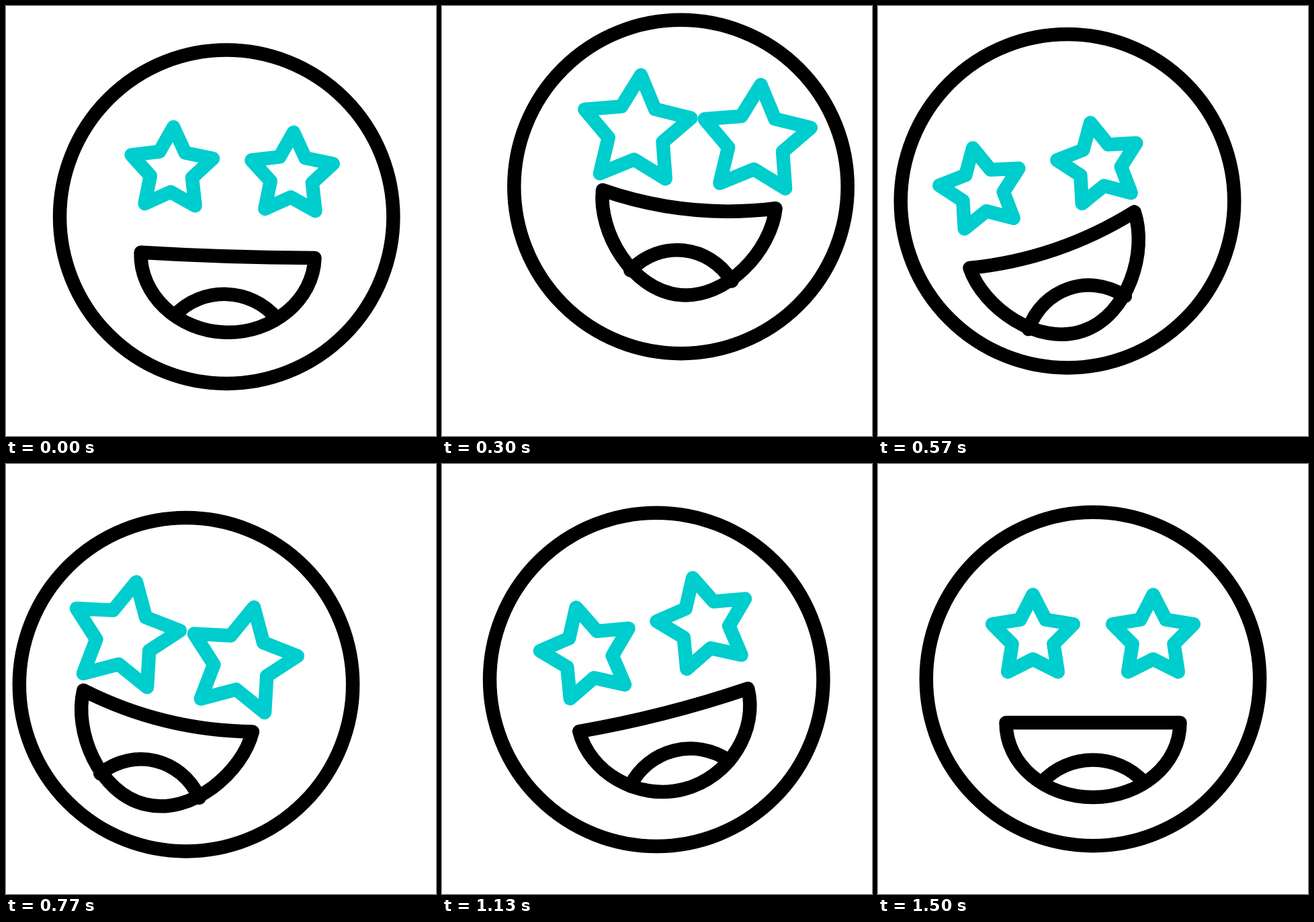
An HTML page with a canvas that plays this animation: 640x640 px, repeating every 1670 ms.

```html
<!DOCTYPE html>
<html lang="en">
<head>
<meta charset="utf-8">
<title>Star-struck face</title>
<style>
  html, body { margin: 0; width: 100%; height: 100%; overflow: hidden; background: #fff; }
  canvas { display: block; width: 640px; height: 640px; }
</style>
</head>
<body>
<canvas id="stage" width="640" height="640"></canvas>
<script>
const ctx = document.getElementById('stage').getContext('2d');
const LOOP = 1670, STEP = 1000 / 30, LAST = 49;
const INK = '#000', TEAL = '#00cdcd';
const { PI, sin, cos, min, max } = Math;

const ramp = (step, from, to) => max(0, min(1, (step - from) / (to - from)));
const ease = u => (1 - cos(PI * u)) / 2;
const radians = degrees => degrees * PI / 180;

// Smooth curve through [step, value] points that comes to rest at the last one.
function spline(points) {
  const n = points.length - 1;
  const rise = i => (points[i + 1][1] - points[i][1]) / (points[i + 1][0] - points[i][0]);
  const slopes = points.map(([t], i) => {
    if (i === 0) return rise(0);
    if (i === n) return 0;
    const before = t - points[i - 1][0], after = points[i + 1][0] - t;
    return (rise(i - 1) * after + rise(i) * before) / (before + after);
  });
  return step => {
    if (step >= points[n][0]) return points[n][1];
    const i = points.findIndex(p => p[0] > step) - 1;
    const [t0, v0] = points[i], [t1, v1] = points[i + 1];
    const span = t1 - t0, u = (step - t0) / span, w = 1 - u;
    return v0 * w * w * (1 + 2 * u) + v1 * u * u * (3 - 2 * u) +
           span * u * w * (slopes[i] * w - slopes[i + 1] * u);
  };
}

// Path through [step, x, y] points.
function path(points) {
  const x = spline(points.map(p => [p[0], p[1]]));
  const y = spline(points.map(p => [p[0], p[2]]));
  return step => [x(step), y(step)];
}

// The head swings once round a loop; the features run ahead of it.
const headPath = path([[0, 8.2, -6.2], [5, 38, -33], [9, 35.5, -51], [17, -38, -29.7],
                       [23, -52, 8.3], [28, -24, 15.5], [35, 0, 0]]);
const facePath = path([[0, 4.9, -3.9], [9, 18, -14], [17, -27, 25], [23, -17, 7.7], [28, -1, 1], [31, 0, 0]]);
const mouthTwist = spline([[0, -0.7], [9, 1.4], [17, -6.7], [23, 1.6], [28, -6.5], [34, 0]]);

// The features rock from side to side, then settle upright.
function faceTilt(step) {
  if (step < 5) return 15 * ramp(step, -1, 5);
  if (step < 35) return 15 * sin(PI * step / 10);
  return -15 * (1 - ease(ramp(step, 35, 45)));
}

function starScale(step) {
  const pulse = step < 10 ? ease(ramp(step, -1, 10)) : ease((step - 3) / 7);
  return 1 + 0.32 * pulse * (step < 45);
}

const held = (step, end) => ramp(step, -1, 7) * (1 - ramp(step, 30, end));

function drawStar(x, y, scale) {
  ctx.beginPath();
  for (let i = 0; i < 10; i++) {
    const r = (i % 2 ? 32.5 : 63.5) * scale;
    const angle = PI * (i / 5 - 0.5);
    ctx.lineTo(x + r * cos(angle), y + r * sin(angle));
  }
  ctx.closePath();
  ctx.stroke();
}

function drawMouth(open) {
  const half = 129.5, depth = 111 + 32 * open, side = 62, base = 71.5;
  ctx.beginPath();
  ctx.moveTo(-half, 0);
  ctx.quadraticCurveTo(0, 30 * open, half, 0);
  ctx.bezierCurveTo(half, side, base, depth, 0, depth);
  ctx.bezierCurveTo(-base, depth, -half, side, -half, 0);
  ctx.closePath();
  ctx.stroke();

  const end = 0.8 * depth, peak = 55.5 + 21 * open;
  const control = end - (end - peak) * 4 / 3;
  ctx.beginPath();
  ctx.moveTo(-76, end);
  ctx.bezierCurveTo(-36, control, 36, control, 76, end);
  ctx.stroke();
}

function draw(step) {
  const open = held(step, 36), lift = held(step, 39.5);

  ctx.fillStyle = '#fff';
  ctx.fillRect(0, 0, 640, 640);
  ctx.lineWidth = 20.5;
  ctx.lineJoin = ctx.lineCap = 'round';
  ctx.strokeStyle = INK;

  ctx.save();
  ctx.translate(320, 320);
  ctx.translate(...headPath(step));
  ctx.beginPath();
  ctx.arc(0, 0, 248.2, 0, 2 * PI);
  ctx.stroke();

  ctx.translate(...facePath(step));
  ctx.rotate(radians(faceTilt(step)));

  ctx.save();
  ctx.translate(-3 * open, 65 - 32 * lift);
  ctx.rotate(radians(mouthTwist(step)));
  drawMouth(open);
  ctx.restore();

  ctx.strokeStyle = TEAL;
  for (const side of [-1, 1]) drawStar(side * 89.5, -62, starScale(step));
  ctx.restore();
}

function tick() {
  const time = performance.now() % LOOP;
  draw(min(LAST, Math.floor((time + 4) / STEP)));
  requestAnimationFrame(tick);
}
tick();
</script>
</body>
</html>
```
